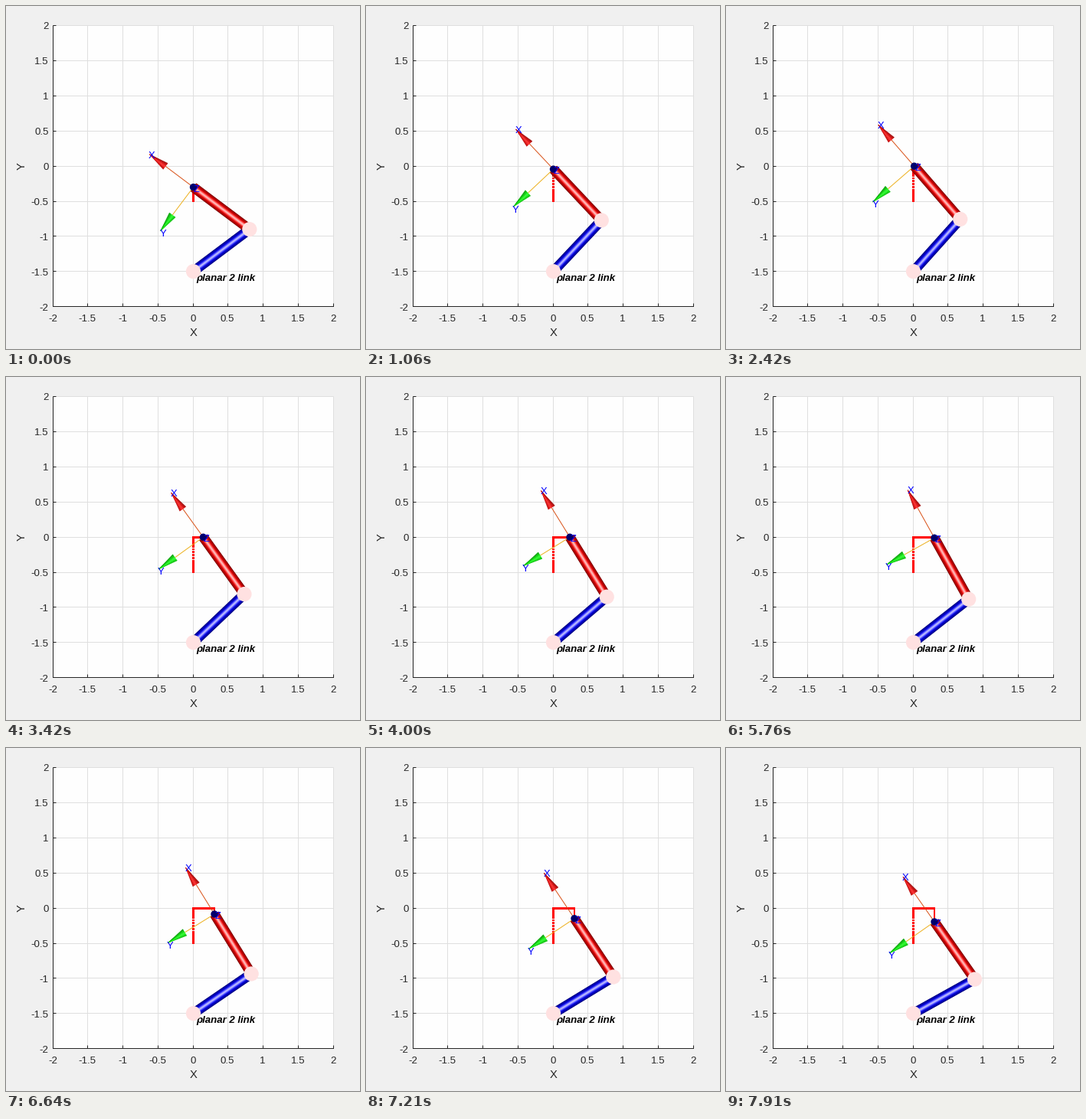
A matplotlib script that plays this animation: 462 px wide and 448 px high, repeating every 8000 ms.

```python
import numpy as np
import matplotlib.pyplot as plt
from matplotlib.animation import FuncAnimation
from matplotlib.collections import PolyCollection

W, H, DPI = 462, 448, 64
PT = 72 / DPI                      # points per pixel
LOOP, INTERVAL = 8000, 40
SCALE = 91.65                      # pixels per unit
ORIGIN = np.array([244.5, 209.2])
INK, GRID = "#262626", "#dfdfdf"
RED, GREEN, BLUE = (1, 0, 0), (0, 1, 0), (0, 0, 1)
PINK, NAVY = "#ffe1e1", "#00006c"

# tool path: three straight legs, each eased over LEG ms
CORNERS = np.array([(0, -0.5), (0, 0), (0.3, 0), (0.3, -0.2)])
LEG, START = 3300, -1475
BASE = np.array([0, -1.5])

# moments at which the picture is refreshed
STEPS = np.concatenate([
    [0], np.linspace(160, 1060, 7), [1350, 1500, 1800],
    np.linspace(2120, 3120, 8), np.linspace(3420, 4450, 8),
    [4580, 4730, 5030], np.linspace(5330, 6340, 8),
    np.linspace(6640, 7640, 8), [7910]])


def tool(t):
    u = max(0, (t - START) / LEG)
    k = min(int(u), 2)
    u = min(u - k, 1)
    s = u**3 * (10 - 15 * u + 6 * u * u)
    return CORNERS[k] + s * (CORNERS[k + 1] - CORNERS[k])


def elbow(tip):
    d = tip - BASE
    r = np.hypot(*d)
    side = np.array([d[1], -d[0]]) / r
    return (BASE + tip) / 2 + side * np.sqrt(1 - r * r / 4)


def to_px(p):
    return ORIGIN + SCALE * np.asarray(p) * (1, -1)


def shade(color, u, gloss):
    """Lit colour of a round surface at relative offset u from its axis."""
    lit = np.sqrt(max(0, 1 - u * u))
    c = np.array(color) * (0.45 + 0.4 * lit) + gloss * lit**16
    return np.clip(c, 0, 1)


fig = plt.figure(figsize=(W / DPI, H / DPI), dpi=DPI, facecolor="#f0f0f0")
ax = fig.add_axes([0, 0, 1, 1])
ax.set_xlim(0, W)
ax.set_ylim(H, 0)
ax.axis("off")


def line(xs, ys, color, width=1, z=1):
    return ax.plot(xs, ys, color=color, lw=width * PT, zorder=z,
                   solid_capstyle="butt", snap=False)[0]


def label(x, y, s, size=13.3, color=INK, **kw):
    return ax.text(x, y, s, fontsize=size * PT, color=color,
                   family="Liberation Sans", **kw)


def disc(p, r, color, z):
    c = plt.Circle(p, r, fc=color, ec="none", zorder=z)
    ax.add_patch(c)
    return c


def draw_axes():
    left, right, top, bottom = 61.5, 427.5, 25.5, 392.5
    ax.add_patch(plt.Rectangle((61, 25), 367, 368, fc="#fefefe", ec="none",
                               zorder=0))
    for v in np.arange(-2, 2.5, 0.5):
        x = int(244.2 + 91.5 * v) + 0.5
        y = int(209.2 - 91.75 * v) + 0.5
        line([x, x], [top, bottom], GRID)
        line([left, right], [y, y], GRID)
        line([x, x], [bottom, bottom - 4], INK, z=1.5)
        line([left, left + 4], [y, y], INK, z=1.5)
        label(x - 0.6, 412.5, f"{v:g}", ha="center")
        label(55.5, y + 5, f"{v:g}", ha="right")
    line([left, left], [top, bottom + 0.5], INK, z=1.5)
    line([left - 0.5, right + 0.5], [bottom, bottom], INK, z=1.5)
    label(244.5, 431, "X", 14.7, ha="center")
    label(25, 208.6, "Y", 14.7, ha="center", rotation=90,
          rotation_mode="anchor")


class Tube:
    def __init__(self, color, z):
        self.layers = [line([], [], shade(color, u, 0.78), 13 * u, z)
                       for u in np.linspace(1, 0.08, 12)]

    def place(self, a, b):
        for layer in self.layers:
            layer.set_data(*zip(a, b))


class Arrow:
    REACH, HEAD, HALF = 0.78 * SCALE, 26, 5

    def __init__(self, name, color, stem):
        self.edges = np.linspace(-1, 1, 10)
        mids = (self.edges[1:] + self.edges[:-1]) / 2
        faces = [shade(color, u * 0.9 + 0.1, 0.14) for u in mids]
        self.stem = line([], [], stem, 1, 5)
        self.head = PolyCollection([], facecolors=faces, edgecolors=faces,
                                   linewidths=0.3, zorder=5.5)
        ax.add_collection(self.head)
        self.text = label(0, 0, name, 13, "blue", ha="left", zorder=9)

    def place(self, tip, d):
        end = tip + self.REACH * d
        foot = end - self.HEAD * d
        side = np.array([-d[1], d[0]]) * self.HALF
        rim = [foot + u * side for u in self.edges]
        self.head.set_verts([[end, a, b] for a, b in zip(rim, rim[1:])])
        self.stem.set_data(*zip(tip, foot))
        self.text.set_position(tip + 0.8 * SCALE * d + (0, 6.2))


draw_axes()
label(248.6, 359, "planar 2 link", color="black", weight="bold",
      style="italic", zorder=3)
DOT = 1.4 * np.array([(-1, -1), (1, -1), (1, 1), (-1, 1)])
trail = PolyCollection([], facecolors="red", edgecolors="none", zorder=2)
ax.add_collection(trail)
lower, upper = Tube(BLUE, 4), Tube(RED, 4.2)
disc(to_px(BASE), 9.6, PINK, 7)
joint = disc((0, 0), 9.6, PINK, 7)
hand = disc((0, 0), 4.7, NAVY, 8)
arrow_x = Arrow("X", RED, "#d95319")
arrow_y = Arrow("Y", GREEN, "#edb120")
text_z = label(0, 0, "Z", 13, "blue", ha="left", zorder=9)


def update(i):
    now = (i + 1) * INTERVAL - 1
    t = STEPS[STEPS <= now][-1]
    tip = tool(t)
    a, b, c = to_px(BASE), to_px(elbow(tip)), to_px(tip)
    lower.place(a, b)
    upper.place(b, c)
    joint.center, hand.center = b, c
    d = (c - b) / np.hypot(*(c - b))
    arrow_x.place(c, d)
    arrow_y.place(c, np.array([d[1], -d[0]]))
    text_z.set_position(c + (0.5, 6.2))
    trail.set_verts([to_px(tool(m)) + DOT
                     for m in np.arange(-1500, t + 1, 150)])
    return []


anim = FuncAnimation(fig, update, frames=LOOP // INTERVAL, interval=INTERVAL,
                     repeat=True, repeat_delay=0)
plt.show()
```
